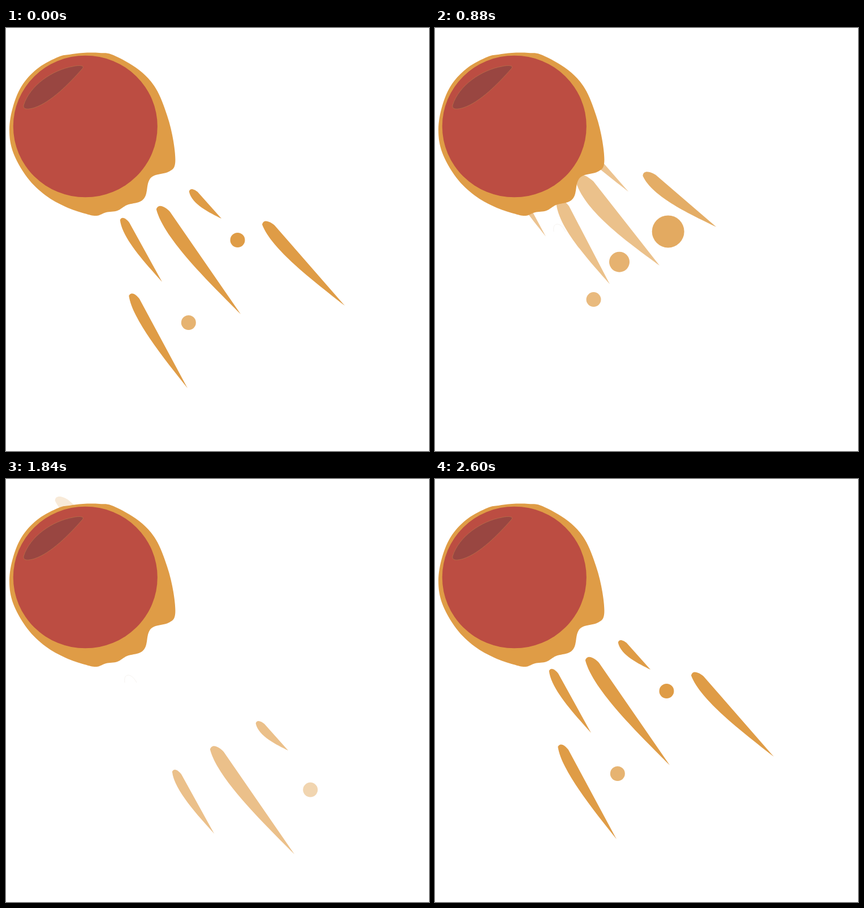
These frames come from a looping animation (748 px wide and 748 px high, 2640 ms). An HTML page:

```html
<!DOCTYPE html>
<html lang="en">
<head>
<meta charset="utf-8">
<title>Meteor</title>
<style>
  html, body { margin: 0; height: 100%; overflow: hidden; background: #fff; }
  svg { display: block; width: 100%; height: 100%; }
</style>
</head>
<body>
<svg viewBox="0 0 748 748">
  <path id="wisp" d="M210 360C207 343 222 342 231 360" fill="none" stroke="#f6f3f0"/>
  <g id="tail" fill="#df9c46"></g>
  <path id="crust" fill="#df9c46"/>
  <ellipse cx="140.3" cy="174" rx="127.5" ry="125.3" fill="#bc4d42"/>
  <path fill="#994641" stroke="#b9704b" stroke-width=".8" d="M136 68C134 66 126 66 118 68C83 74 42 101 31 137
    C30 145 40 144 50 141C80 131 112 98 134 73C136 71 137 69 136 68Z"/>
</svg>
<script>
const STEP = 40, FRAMES = 66, CYCLE = 64, HELD = 51;
const byId = id => document.getElementById(id);
const parts = [];

// Smooth closed curve through the given points (Catmull-Rom).
function smooth(points) {
  const n = points.length, at = i => points[(i + n) % n];
  return 'M' + points[0] + points.map((p, i) => {
    const [before, next, after] = [at(i - 1), at(i + 1), at(i + 2)];
    const c1 = p.map((v, k) => v + (next[k] - before[k]) / 6);
    const c2 = next.map((v, k) => v - (after[k] - p[k]) / 6);
    return `C${c1} ${c2} ${next}`;
  }).join('') + 'Z';
}

// A part passes `peak` at its wave's peak step, drifting by `inward` per step before and `outward` after.
function add(tag, attrs, wave, peak, inward, outward = inward) {
  const el = document.createElementNS('http://www.w3.org/2000/svg', tag);
  for (const name in attrs) el.setAttribute(name, attrs[name]);
  byId('tail').append(el);
  parts.push({ el, wave, peak, inward, outward });
}

// Drop with its sharp tip at 0,0, one straight edge to (dx, dy) and a bulge beside it.
function streak(dx, dy, width, ...motion) {
  const len = Math.hypot(dx, dy), ux = dx / len, uy = dy / len;
  const at = (along, over, side) => {
    const s = along * len + over * width, n = side * width;
    return [s * ux + n * uy, s * uy - n * ux];
  };
  const d = `M0 0L${dx} ${dy}C${at(1, .35, .05)} ${at(1, .85, .25)} ${at(1, .6, .6)}`
    + `C${at(.85, 0, 1.25)} ${at(.33, 0, .45)} 0 0Z`;
  add('path', { d }, ...motion);
}

// Larger dots become visible sooner.
const dot = (r, wave, ...motion) => add('circle', { r }, { ...wave, soft: 12 / r }, ...motion);

const wave = (start, peak, hold, end, soft, slow = 1) => ({ start, peak, hold, end, soft, slow });
const near = wave(34, 64, 64, 79.5, .5);
const far = wave(49, 64, 78, 98, 1, .73);
const farDot = wave(49, 69, 78, 98);
const quick = wave(3, 16, 16, 32, 1);
const late = wave(3, 31, 31, 50, .5);

streak(-58, -105, 20, near, [276, 449], [-5.12, -9.9], [-5.2, -9.7]);
streak(-125, -181, 29, near, [415, 506], [-5.28, -8.75], [-10.5, -12.8]);
streak(-42, -47, 18, near, [381, 337], [-6.55, -7.95], [-8, -7]);
dot(13, near, [409.5, 375], [-7.15, -9.7], [-8.3, -9.7]);

streak(-124, -142, 26, far, [599, 491], [-8.3, -9.9], [-26.9, -21.1]);
streak(-85, -158, 23, far, [321, 637], [-5.57, -12], [-13.1, -28.1]);
dot(13, farDot, [295, 460.5], [-5.57, -12.1], [-7.1, -11.5]);

streak(-72, -138, 28, quick, [361.5, 543], [-8.75, -11], [-8.75, -15]);
streak(-117, -149, 38, quick, [484, 509.5], [-8.5, -8.8], [-14.5, -14.9]);
streak(-107, -92, 27, late, [392, 268], [-11.7, -9.3]);
dot(18, late, [268.4, 344.4], [-6.4, -7.7]);
dot(28.5, late, [333, 294.5], [-8.8, -7.27]);
dot(13, late, [237.3, 382], [-4.8, -10.9]);

byId('crust').setAttribute('d', smooth([
  [136, 44], [165, 44], [190, 48], [235, 74], [265, 107], [285, 155], [296, 200], [299, 240],
  [288, 254], [262, 261], [252, 272], [247, 296], [237, 307], [214, 313], [197, 323], [177, 326],
  [160, 332], [139, 328], [105, 316], [70, 296], [38, 265], [13, 221], [6, 180], [13, 137],
  [30, 99], [58, 70], [93, 51], [112, 47]
]));

function opacity({ start, peak, hold, end, soft }, u) {
  if (u <= start || u >= end) return 0;
  if (u < peak) return ((u - start) / (peak - start)) ** soft;
  return Math.min(1, (end - u) / (end - hold));
}

function draw(now) {
  const n = Math.floor(now / STEP) % FRAMES;
  const step = (n > HELD ? n - 1 : n) % CYCLE;
  for (const { el, wave, peak, inward, outward } of parts) {
    const u = step < wave.start ? step + CYCLE : step;
    const d = u - wave.peak;
    const pos = peak.map((v, k) => v + (d < 0 ? inward[k] * d : outward[k] * d ** wave.slow));
    el.setAttribute('transform', `translate(${pos})`);
    el.setAttribute('opacity', opacity(wave, u));
  }
  byId('wisp').setAttribute('opacity', step > 10 && step < 62 ? 1 : 0);
}

const begin = performance.now();
function loop() {
  draw(performance.now() - begin);
  requestAnimationFrame(loop);
}
loop();
</script>
</body>
</html>
```
